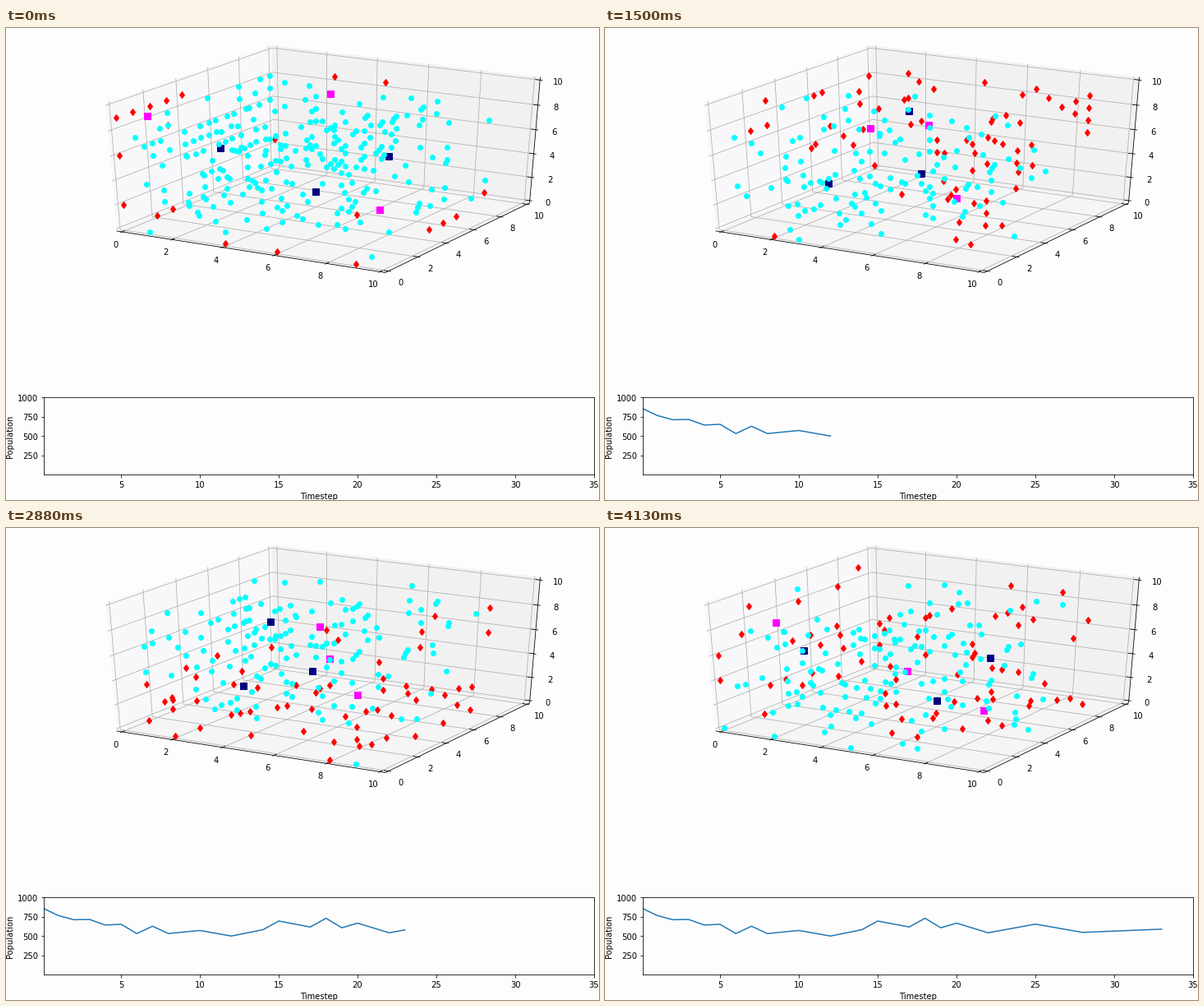
A matplotlib script that plays this animation: 722 by 574 pixels, repeating every 4260 ms.

```python
import matplotlib.pyplot as plt
import numpy as np
from matplotlib.animation import FuncAnimation
from matplotlib.patches import Polygon

W, H, DPI = 722, 574, 72
LOOP, TICK, STEP = 4260, 20, 125
STEPS = 34
LO, HI = -10 / 48, 10 + 10 / 48      # box walls sit just outside the 0..10 range
SHAPE = (10, 10, 10)
BACK = "#fefdfe"

plt.rcParams.update({"font.family": "DejaVu Sans", "font.size": 10})
rng = np.random.default_rng(11)


def project(x, y, z):
    """Perspective view (elev 30, azim -60) of the 10-unit box, in pixels."""
    a, b, c = (np.asarray(v, float) / 10 - 0.5 for v in (x, y, z))
    elev, azim = np.radians(30), np.radians(-60)
    right = -np.sin(azim) * a + np.cos(azim) * b
    flat = np.cos(azim) * a + np.sin(azim) * b
    up = np.cos(elev) * c - np.sin(elev) * flat
    depth = np.cos(elev) * flat + np.sin(elev) * c
    scale = 10 / (10 - depth)
    return 390.3 + 362.2 * right * scale, 154.4 - 171 * up * scale


# ---- simulation -----------------------------------------------------------

# Turning points of the population curve; straight runs are interpolated
TURNS = [(0, 868), (1, 770), (2, 714), (3, 718), (4, 645), (5, 655),
         (6, 535), (7, 630), (8, 535), (10, 575), (12, 503), (14, 585),
         (15, 697), (17, 620), (18, 733), (19, 610), (20, 670), (22, 545),
         (25, 657), (28, 550), (33, 592)]
POPULATION = np.interp(range(STEPS), *zip(*TURNS))
RED_COUNT = np.interp(range(STEPS), [0, 3, 9, 15, 19, 26],
                      [21, 20, 60, 78, 50, 68])

GRID = np.indices(SHAPE).reshape(3, -1)
OFF = GRID - 4.5
RADIUS = (OFF ** 2).sum(0) / 61
RIGHT = 0.87 * OFF[0] + 0.5 * OFF[1]


def pick(cells, n, weight):
    p = weight[cells]
    return rng.choice(cells, min(n, len(cells)), replace=False, p=p / p.sum())


def wander(cells):
    """Move every dot to a neighbouring cell along a random axis."""
    pos = GRID[:, cells].copy()
    axis = rng.integers(0, 3, len(cells))
    pos[axis, np.arange(len(cells))] += rng.integers(-1, 2, len(cells))
    return np.unique(np.ravel_multi_index(np.clip(pos, 0, 9), SHAPE))


def advance(cells, n, weight, taken):
    kept = np.setdiff1d(wander(cells), taken)
    if len(kept):
        kept = pick(kept, int(0.7 * n), weight)
    free = np.setdiff1d(np.arange(1000), np.concatenate([kept, taken]))
    return np.concatenate([kept, pick(free, n - len(kept), weight)]).astype(int)


def first_red(n):
    """Two short rows, then random cells along the edges of the box."""
    rows = [(0, y, 9) for y in range(4)] + [(9, y, 0) for y in (5, 6, 7)]
    rows = np.ravel_multi_index(np.array(rows).T, SHAPE)
    edge = np.flatnonzero(((GRID == 0) | (GRID == 9)).sum(0) >= 2)
    rest = rng.choice(np.setdiff1d(edge, rows), n - len(rows), replace=False)
    return np.concatenate([rows, rest])


def simulate():
    none = np.array([], int)
    red, cyan, history = first_red(int(RED_COUNT[0])), none, []
    for k in range(STEPS):
        split = np.exp(-((k - 15) / 3) ** 2)      # the two kinds drift apart
        lean = ((0.04 + 0.36 * split) * RIGHT
                + 0.15 * np.sin(2 * np.pi * k / 30) * OFF[2])
        if k:
            red = advance(red, round(RED_COUNT[k]),
                          np.exp(1.3 * RADIUS + lean), none)
        total = round(90 + 0.2 * POPULATION[k])
        cyan = advance(cyan, total - len(red),
                       np.exp(-(1.4 + 2 * split) * RADIUS - 0.8 * lean), red)
        history.append((project(*GRID[:, red]), project(*GRID[:, cyan])))
    return history


HISTORY = simulate()


def roam(start, centre, period=33):
    """Swing about a centre with some jitter; one pixel place per step."""
    swing = np.cos(2 * np.pi * np.arange(STEPS) / period)[:, None]
    jitter = rng.normal(0, (14, 5), (STEPS, 2))
    jitter[0] = 0
    start, centre = np.array(start), np.array(centre)
    return centre + (start - centre) * swing + jitter + 0.5


NAVY = np.stack([roam((260, 146), (310, 122)),
                 roam((465, 156), (405, 168)),
                 roam((376, 199), (315, 190))], axis=2)
MAGENTA = np.stack([roam((171, 107), (295, 117), 38),
                    roam((394, 80), (385, 130), 62),
                    roam((454, 221), (445, 209))], axis=2)

# ---- static scene ---------------------------------------------------------

fig = plt.figure(figsize=(722.01 / DPI, 574.01 / DPI), dpi=DPI, facecolor=BACK)
scene = fig.add_axes([0, 0, 1, 1])
scene.set(xlim=(0, W), ylim=(H, 0))
scene.axis("off")


def path(points, color):
    x, y = project(*np.array(points).T)
    scene.plot(x, y, color=color, lw=0.8, zorder=2)


def wall(points, color):
    xy = np.column_stack(project(*np.array(points).T))
    scene.add_patch(Polygon(xy, facecolor=color, edgecolor="none", zorder=1))


def label(point, shift, value):
    x, y = project(*point)
    scene.text(x + shift[0], y + shift[1], str(value),
               ha="center", va="center")


wall([(LO, LO, LO), (LO, HI, LO), (LO, HI, HI), (LO, LO, HI)], "#f8f8fa")
wall([(LO, HI, LO), (HI, HI, LO), (HI, HI, HI), (LO, HI, HI)], "#f2f1f2")
wall([(LO, LO, LO), (HI, LO, LO), (HI, HI, LO), (LO, HI, LO)], "#f5f5f5")

for t in range(0, 11, 2):
    path([(t, LO, LO), (t, HI, LO), (t, HI, HI)], "#b0b0b0")
    path([(HI, t, LO), (LO, t, LO), (LO, t, HI)], "#b0b0b0")
    path([(LO, LO, t), (LO, HI, t), (HI, HI, t)], "#b0b0b0")

path([(LO, LO, LO), (HI, LO, LO), (HI, HI, LO), (HI, HI, HI)], "black")

IN, OUT = 1 / 6, 1 / 12
for t in range(0, 11, 2):
    path([(t, LO - OUT, LO), (t, LO + IN, LO)], "black")
    path([(HI + OUT, t, LO), (HI - IN, t, LO)], "black")
    path([(HI + OUT, HI, t), (HI - IN, HI, t)], "black")
    label((t, LO, LO), (-7.5, 16), t)
    label((HI, t, LO), (14.5, 14.5), t)
    label((HI, HI, t), (22, 3), t)

chart = fig.add_axes([46 / W, 30.5 / H, 670 / W, 94 / H], facecolor=BACK)
chart.set(xlim=(0.1, 35), ylim=(0, 1000), xlabel="Timestep",
          ylabel="Population", xticks=range(5, 36, 5),
          yticks=range(250, 1001, 250))

# ---- moving parts ---------------------------------------------------------


def markers(shape, color, size, order):
    return scene.plot([], [], shape, color=color, ms=size, zorder=order)[0]


navy = markers("s", "navy", 8, 3)
magenta = markers("s", "magenta", 8, 4)
red = markers("d", "red", 6, 5)
cyan = markers("o", "cyan", 6, 6)
curve, = chart.plot([], [], color="#1f77b4", lw=1.5)


def update(i):
    k = min(STEPS - 1, (i * TICK + TICK // 2) // STEP)
    navy.set_data(*NAVY[k])
    magenta.set_data(*MAGENTA[k])
    red.set_data(*HISTORY[k][0])
    cyan.set_data(*HISTORY[k][1])
    curve.set_data(range(k + 1), POPULATION[:k + 1])
    return navy, magenta, red, cyan, curve


anim = FuncAnimation(fig, update, frames=LOOP // TICK, interval=TICK,
                     init_func=lambda: update(0), repeat=True, repeat_delay=0)
plt.show()
```
